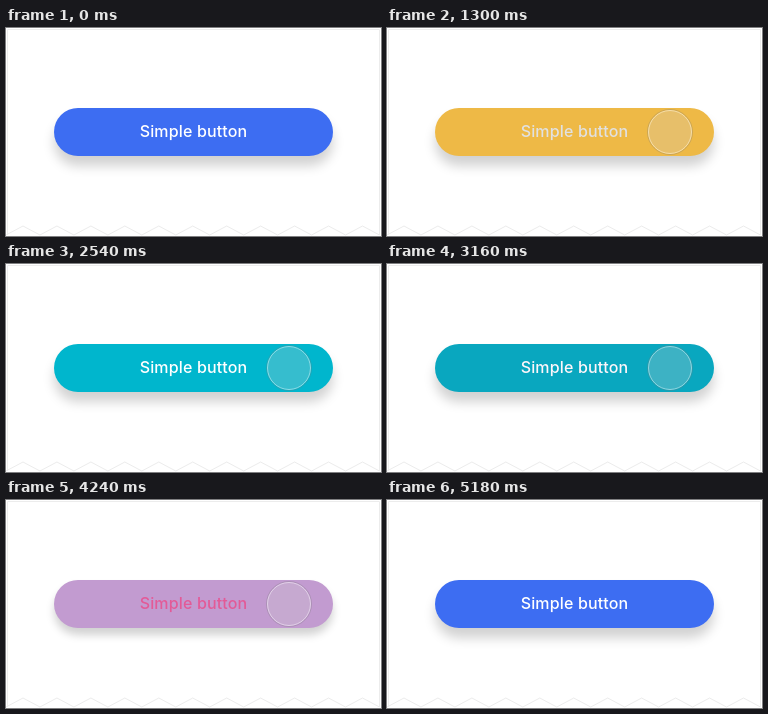
An HTML page that plays this animation: 375x208 px, repeating every 5500 ms.

```html
<!DOCTYPE html>
<html lang="en">
<head>
<meta charset="utf-8">
<title>Simple button</title>
<style>
  html, body { margin: 0; width: 100%; height: 100%; overflow: hidden; background: #fff; }
  svg, #button { position: absolute; }
  svg { left: 0; top: 0; }
  #button {
    left: 48px; top: 80px; width: 279px; height: 48px; border-radius: 24px;
    font: 500 16px/47px Inter, sans-serif; letter-spacing: .15px; text-align: center;
  }
</style>
</head>
<body>
<div id="button">Simple button</div>
<svg width="375" height="208" fill="none">
  <path id="paper" stroke="#ececec"/>
  <g id="pointer">
    <circle r="22.5" stroke="#787878" stroke-opacity=".3"/>
    <circle r="21.5" fill="#cfcfcf" fill-opacity=".26" stroke="#fff" stroke-opacity=".5"/>
  </g>
</svg>
<script>
const LOOP = 5500, PRESS = 240, HOLD = 300, RELEASE = 350;
const button = document.getElementById('button');
const pointer = document.getElementById('pointer');

// Paper outline with a torn lower edge
const TEETH = 11, WIDTH = 373.5;
let outline = `M1.5 207V1.5H${WIDTH}V207M0 207`;
for (let i = 1; i <= 2 * TEETH; i++) {
  outline += `L${i * WIDTH / (2 * TEETH)} ${i % 2 ? 198 : 207}`;
}
document.getElementById('paper').setAttribute('d', outline);

// Each click tints the button, then releases it into its next look
const rest = { fill: '#3d6df2', ink: '#fff' };
const clicks = [
  { at: 920, tint: '#eeb946', fill: '#eeb946', ink: '#222' },
  { at: 1820, tint: '#e2a838', fill: '#00b6cd', ink: '#fff' },
  { at: 2820, tint: '#00a5be', fill: '#f4cfdb', ink: '#d81b70' },
  { at: 3820, tint: '#f4adc3', ...rest, lift: true }
];
clicks[1].lift = true;

const ease = (t, from, length) => {
  const p = Math.min(1, Math.max(0, (t - from) / length));
  return p * p * (3 - 2 * p);
};
const mix = (a, b, p) => `color-mix(in srgb, ${b} ${p * 100}%, ${a})`;

function draw(now) {
  const t = now % LOOP;
  let { fill, ink } = rest, dip = 0;
  for (const click of clicks) {
    if (t < click.at) break;
    const p = ease(t, click.at + HOLD, RELEASE);
    fill = mix(mix(fill, click.tint, ease(t, click.at, PRESS)), click.fill, p);
    ink = mix(ink, click.ink, p);
    if (click.lift) dip = Math.sin(Math.PI * p);
  }
  button.style.background = fill;
  button.style.color = ink;
  button.style.boxShadow = `0 ${10 - 4 * dip}px ${12 - 4 * dip}px rgba(0,0,0,.18)`;

  // Comes in from the upper right and leaves the same way
  const away = 1 - ease(t, 160, 440) + ease(t, 4840, 340);
  pointer.setAttribute('transform', `translate(${283 + 70 * away} ${104 - 130 * away})`);
}

const start = performance.now();
function tick() {
  draw(performance.now() - start);
  requestAnimationFrame(tick);
}
tick();
</script>
</body>
</html>
```
